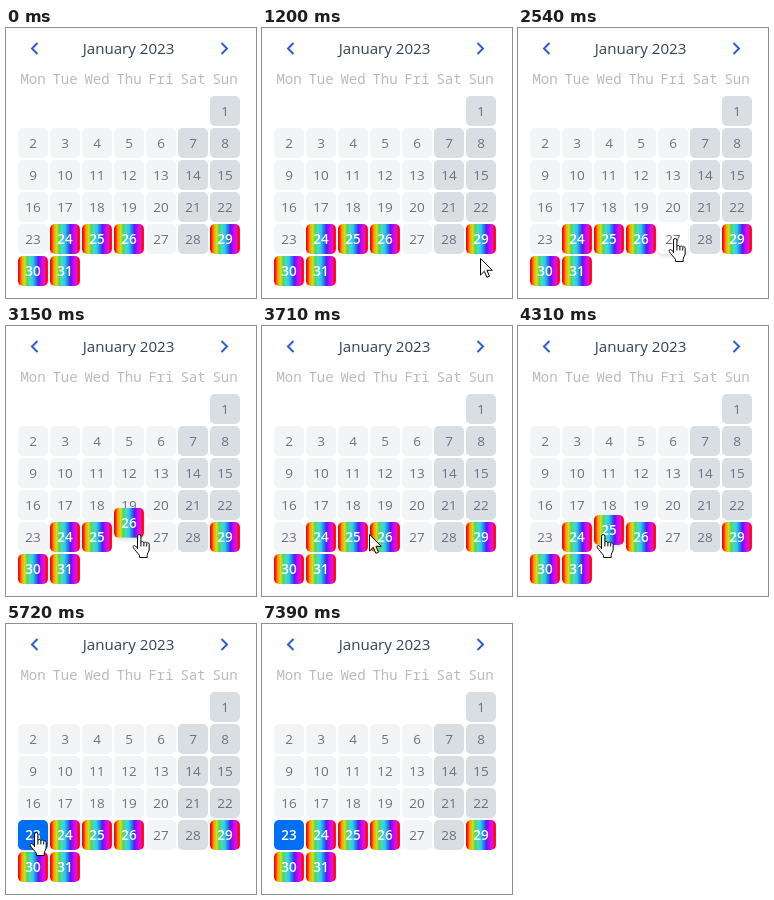
Recreate the animation shown at these times as an HTML page. Size 250 px wide and 270 px high, loop 8180 ms.

```html
<!DOCTYPE html>
<html lang="en">
<head>
<meta charset="utf-8">
<title>Calendar</title>
<style>
  html, body { margin: 0; width: 100%; height: 100%; overflow: hidden; background: #fff; }
  body { position: relative; font: 13.5px "Open Sans", "Noto Sans", sans-serif; color: #6b7280; }
  body > * { position: absolute; }
  .title { left: 0; width: 245px; top: 8px; line-height: 24px; text-align: center; font-size: 15.1px; color: #334155; }
  .name { top: 41px; width: 30px; text-align: center; font: 300 14px/20px "Noto Sans Mono", monospace; color: #b7bcc4; }
  .day { box-sizing: border-box; width: 30px; height: 30px; line-height: 28px; text-align: center;
    border: 1px solid transparent; border-radius: 5px; background: #f3f4f6; }
  .weekend { background: #d9dee3; }
  .hover { background: #fff; box-shadow: 0 2px 4px rgba(0, 0, 0, .12); }
  .rainbow, .picked { color: #fff; font-weight: 600; }
  .rainbow { background: linear-gradient(90deg, #f00, #ff9a00, #d0de21, #4fdc4a, #3fdad8,
    #2fc9e2, #1c7fee, #5f15f2, #ba0cf8, #fb07d9, #f00); }
  .picked { background: #006ff5; }
  .nav { left: 0; top: 0; fill: none; stroke: #2f5bd0; stroke-width: 2; }
  .cursor { left: 0; top: 0; z-index: 3; overflow: visible; fill: #fff; stroke: #000; stroke-linejoin: round; }
</style>
</head>
<body>
<div class="title">January 2023</div>
<svg class="nav" width="250" height="40"><path d="M31.5 15l-5.5 5.5 5.5 5.5M215.5 15l5.5 5.5-5.5 5.5"/></svg>
<svg class="cursor" id="cursor" width="18" height="25">
  <path id="arrow" d="M.5 .5V17l3.8-3.7 2.6 6 2.6-1.1-2.6-5.9h5.4Z"/>
  <path id="hand" d="M-.5 15V2.2a1.7 1.7 0 0 1 3.4 0V8.5a1.6 1.6 0 0 1 3 .3a1.5 1.5 0 0 1 2.8 .6a1.4 1.4 0 0 1 2.5 .9V15c0 3-2 4-2 6.5v2H1.5v-2C0 19-3 16.5-4.7 13.5c-.8-1.6 1-2.6 2.2-1.5l2 2M2.9 8.5v4M5.9 9v3.5M8.7 10v2.5"/>
</svg>
<script>
const LOOP = 8180, PITCH = 32, SIZE = 30, LEFT = 12, TOP = 68, PICK_AT = 5620;
const rainbow = [24, 25, 26, 29, 30, 31];
const bounceStart = { 29: 1222, 26: 2630, 25: 3750, 24: 4505 };

// Pointer stops: time, x, y
const stops = [
  [1000, 222, 271], [1270, 217, 216], [2150, 217, 216], [2690, 133, 208],
  [3480, 132, 208], [3800, 97, 208], [4150, 95, 208], [4700, 57, 208], [5150, 57, 208],
  [5460, 29, 208], [6830, 29, 208], [6890, 35, 208], [7050, 35, 208], [7390, 72, 272]
];

function bezier(x1, y1, x2, y2) {
  const at = (a, b, u) => 3 * a * u * (1 - u) ** 2 + 3 * b * u * u * (1 - u) + u ** 3;
  return x => {
    let lo = 0, hi = 1;
    for (let i = 0; i < 20; i++) {
      const mid = (lo + hi) / 2;
      if (at(x1, x2, mid) < x) lo = mid; else hi = mid;
    }
    return at(y1, y2, lo);
  };
}
const rise = bezier(.215, .61, .355, 1), fall = bezier(.755, .05, .855, .06);
const clamp01 = v => Math.min(1, Math.max(0, v));

function hop(t, start, top, leave, land, height) {
  return height * (rise(clamp01((t - start) / (top - start))) - fall(clamp01((t - leave) / (land - leave))));
}

function bounce(t) {
  if (!(t > 200 && t < 1000)) return 0;
  return hop(t, 200, 400, 430, 530, 30) + hop(t, 530, 700, 700, 800, 15) + hop(t, 800, 900, 900, 1000, 4);
}

function pointer(t) {
  const i = stops.findIndex(s => t < s[0]);
  if (i < 1) return [0, 300];
  const [t0, x0, y0] = stops[i - 1], [t1, x1, y1] = stops[i];
  const k = (t - t0) / (t1 - t0);
  return [x0 + (x1 - x0) * k, y0 + (y1 - y0) * k];
}

function add(className, text, x) {
  const el = document.createElement("div");
  el.className = className;
  el.textContent = text;
  el.style.left = x + "px";
  document.body.append(el);
  return el;
}

["Mon", "Tue", "Wed", "Thu", "Fri", "Sat", "Sun"].forEach((name, i) => add("name", name, LEFT + i * PITCH));

const days = Array.from({ length: 31 }, (_, i) => {
  const n = i + 1, col = (i + 6) % 7, row = Math.floor((i + 6) / 7);
  const x = LEFT + col * PITCH, y = TOP + row * PITCH;
  const el = add("day", n, x);
  el.style.top = y + "px";
  el.classList.toggle("weekend", col > 4);
  el.classList.toggle("rainbow", rainbow.includes(n));
  return { n, x, y, el };
});

const [cursor, hand, arrow] = ["cursor", "hand", "arrow"].map(id => document.getElementById(id));

function draw() {
  const t = performance.now() % LOOP;
  const [px, py] = pointer(t);
  let onDay = false;
  for (const { n, x, y, el } of days) {
    const inside = px >= x && px < x + SIZE && py >= y && py < y + SIZE;
    const lift = bounce(t - bounceStart[n]);
    onDay = onDay || inside;
    el.classList.toggle("hover", inside);
    el.classList.toggle("picked", n === 23 && t >= PICK_AT);
    el.style.transform = lift ? `translateY(${-lift}px)` : "";
    el.style.zIndex = lift ? 2 : inside ? 1 : 0;
  }
  cursor.style.transform = `translate(${Math.round(px)}px, ${Math.round(py)}px)`;
  hand.style.display = onDay ? "" : "none";
  arrow.style.display = onDay ? "none" : "";
  requestAnimationFrame(draw);
}
draw();
</script>
</body>
</html>
```
